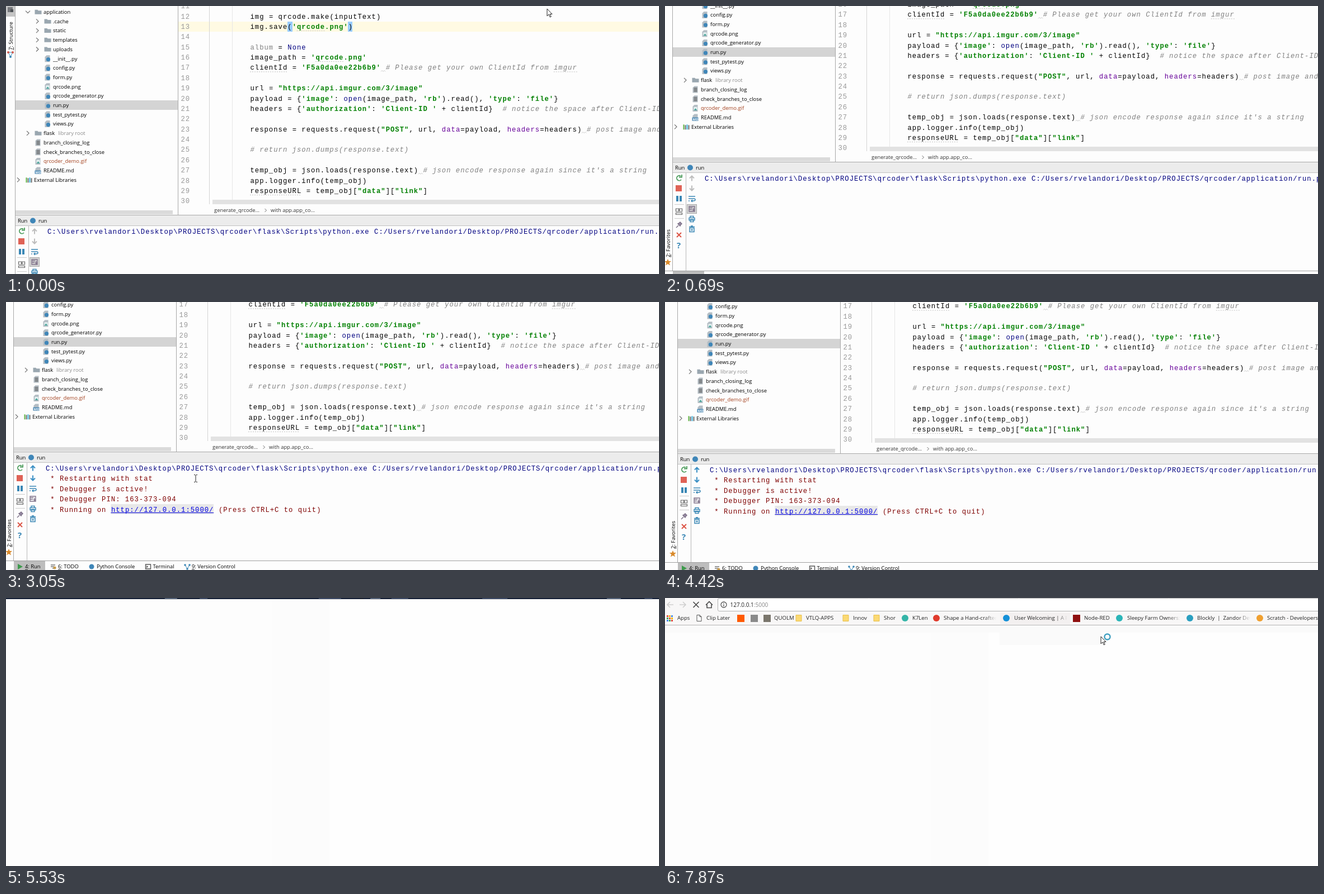
An HTML page with a canvas for the animation above (8 s loop, 1167 by 480 pixels).

```html
<!DOCTYPE html>
<html>
<head>
<meta charset="utf-8">
<style>
html, body { margin: 0; width: 100%; height: 100%; overflow: hidden; background: #fdfdfd; }
canvas { display: block; }
</style>
</head>
<body>
<canvas id="stage" width="1167" height="480"></canvas>
<script>
const g = document.getElementById('stage').getContext('2d');
const W = 1167, H = 480, LOOP = 8000;
const UI = '9.4px "Open Sans", sans-serif';
const WEB = '9.6px "Open Sans", sans-serif';
const MONO = '12.2px "Liberation Mono", monospace';
const CHAR = 8.35, LINE = 18.38;
const BLUE = '#3a87b5', GREY = '#6e6e6e';

// ---- timing: the picture holds between screen updates
const spans = [[0, 0, 1], [120, 1060, 8], [1180, 1180, 1], [1460, 2500, 9], [2660, 3580, 8],
  [3730, 4040, 3], [4420, 5270, 7], [5530, 6440, 8], [6590, 7590, 8], [7720, 7870, 2]];
const ticks = spans.flatMap(([a, b, n]) =>
  Array.from({ length: n }, (_, i) => a + (b - a) * i / (n - 1 || 1)));

// whole-pixel position on a keyed path
function along(keys, t) {
  const i = keys.findIndex(k => k[0] > t);
  if (i < 0) return keys[keys.length - 1].slice(1);
  if (!i) return keys[0].slice(1);
  const a = keys[i - 1], b = keys[i], p = (t - a[0]) / (b[0] - a[0]);
  return [1, 2].map(k => Math.round(a[k] + (b[k] - a[k]) * p));
}

const ideCamera = [[0, 0, 0], [650, -3, -95], [1180, -3, -106], [4280, -3, -106],
  [4420, 6, -103], [4950, 6, 0]];
const ideMouse = [[1180, 962, -20], [1460, 959, 37], [2500, 290, 371], [2800, 290, 371],
  [3580, 600, 23], [4040, 632, -20]];
const webCamera = [[5530, 0, -8], [6590, 0, 0], [7590, 8, -13]];
const webMouse = [[7450, 636, -5], [7590, 640, 10], [7720, 700, 35], [7870, 779, 69]];

// ---- drawing helpers
function rect(x, y, w, h, color) {
  g.fillStyle = color;
  g.fillRect(x, y, w, h);
}
function dot(x, y, r, color) {
  g.fillStyle = color;
  g.beginPath();
  g.arc(x, y, r, 0, 7);
  g.fill();
}
function text(s, x, y, color = '#000', font = UI, drop = 3.3, spacing = 0) {
  g.font = font;
  g.letterSpacing = spacing + 'px';
  g.fillStyle = color;
  g.fillText(s, x, y + drop);
}
function mono(s, x, y, color, style = '') {
  text(s, x + 0.5, y, color, style + MONO, 4, CHAR - 12.2 * 0.6);
}
function path(d, x, y, stroke, fill, width = 1) {
  const p = new Path2D(d);
  g.save();
  g.translate(x, y);
  if (fill) { g.fillStyle = fill; g.fill(p); }
  if (stroke) { g.strokeStyle = stroke; g.lineWidth = width; g.stroke(p); }
  g.restore();
}
function shortcut(s, x, y) {
  text(s, x, y);
  rect(x, y + 4.5, 5, 1, '#333');
}
function upright(s, x, y) {
  g.save();
  g.translate(x, y);
  g.rotate(-Math.PI / 2);
  shortcut(s, 0, 0);
  g.restore();
}
function dotted(x, y, chars) {
  for (let i = 0; i < chars * CHAR; i += 4) rect(x + i, y + 7, 2, 1, '#c4c4c4');
}
const ibeam = (x, y) => path('M-3 -6.5H-1L0 -5.5 1 -6.5H3M0 -5.5V5.5M-3 6.5H-1L0 5.5 1 6.5H3', x, y, '#222');
const arrow = (x, y) => path('M0 0V13L3 10 5.3 15 7.3 14 5 9.5H9Z', x, y, '#222', '#fff');

// ---- project tree
const tree = ('d67 application|d84 .cache|d84 static|d84 templates|d84 uploads|p84 __init__.py|' +
  'p84 config.py|p84 form.py|i84 qrcode.png|p84 qrcode_generator.py|p84 run.py|p84 test_pytest.py|' +
  'p84 views.py|d67 flask|t67 branch_closing_log|t67 check_branches_to_close|i67 qrcoder_demo.gif|' +
  'm67 README.md|l50 External Libraries').split('|');

function treeIcon(kind, x, y) {
  if (kind == 'd') return path('M-6 -4H-1L0 -2.5H6V4H-6Z', x, y, null, '#9aa7b0');
  if (kind == 'l') {
    ['#62b543', '#6e6e6e', '#40b6e0', '#6e6e6e'].forEach((c, i) => rect(x - 5 + i * 3, y - 4 + i % 2, 2, 9 - i % 2, c));
    return;
  }
  path('M-2 -6H4V6H-5V-3Z', x, y, null, '#b4bdc4');
  if (kind == 'p') dot(x + 1, y + 1.5, 3.6, '#3f86b8');
  if (kind == 't') for (let i = 0; i < 4; i++) rect(x - 3, y - 3 + i * 2, 6, 1, '#555');
  if (kind == 'i') { rect(x - 3, y - 2, 6, 6, '#e8f4f4'); path('M-3 4L0 0 3 4Z', x, y, null, '#4ba39a'); }
  if (kind == 'm') { rect(x - 6, y, 11, 6, '#4a88b5'); text('MD', x - 5, y + 2.5, '#fff', 'bold 6px "Open Sans", sans-serif', 2.5); }
}

function drawTree() {
  tree.forEach((row, i) => {
    const kind = row[0], x = +row.slice(1, 3), name = row.slice(4), y = 10.7 + 16.7 * i;
    if (name == 'run.py') rect(17, 169, 290, 17, '#d4d4d4');
    if (kind == 'd' || kind == 'l')
      path(i ? 'M-2 -4L2 0 -2 4' : 'M-4 -2L0 2 4 -2', x - 28, y, GREY, null, 1.2);
    treeIcon(kind, x - 9.5, y);
    text(name, x, y, name.endsWith('.gif') ? '#a3401d' : undefined);
  });
  text('library root', 93, 227.8, '#8c8c8c');
  rect(17, 366, 281, 7, '#dadada');
}

// ---- editor
const source = `img = qrcode.make(inputText)
img.save('qrcode.png')

album = None
image_path = 'qrcode.png'
clientId = 'F5a0da0ee22b6b9' # Please get your own ClientId from imgur

url = "https://api.imgur.com/3/image"
payload = {'image': open(image_path, 'rb').read(), 'type': 'file'}
headers = {'authorization': 'Client-ID ' + clientId}  # notice the space after Client-ID

response = requests.request("POST", url, data=payload, headers=headers) # post image and

# return json.dumps(response.text)

temp_obj = json.loads(response.text) # json encode response again since it's a string
app.logger.info(temp_obj)
responseURL = temp_obj["data"]["link"]`.split('\n');
const token = /#.*|'[^']*'|"[^"]*"|\w+|[^\w'"#]+/g;

function tokenStyle(s, rest) {
  if (s[0] == '#') return ['#808080', 'italic '];
  if (/^['"]/.test(s)) return ['#008000', 'bold '];
  if (/^(None|open)$/.test(s)) return ['#000080'];
  if (/^(data|headers)$/.test(s) && /^=\w/.test(rest)) return ['#660099'];
  return [s == 'album' ? '#808080' : '#000'];
}

function drawEditor() {
  const X = 436, lineY = n => 18.5 + LINE * (n - 12);
  rect(308, 28, W, 18, '#fffae3');
  rect(363, 0, 1, 355, '#d4d4d4');
  rect(404, 0, 1, 347, '#e6e6e6');
  rect(503, 28, 9, 18, '#99ccff');
  rect(611, 28, 8, 18, '#99ccff');
  for (let n = 11; n <= 30; n++) mono(n, 312, lineY(n), '#999');
  source.forEach((s, i) => {
    for (const m of s.matchAll(token)) {
      const x = X + m.index * CHAR;
      mono(m[0], x, lineY(i + 12), ...tokenStyle(m[0], s.slice(m.index + m[0].length)));
      // style hint where a trailing comment has only one space before it
      if (m[0][0] == '#' && m.index && s[m.index - 2] != ' ')
        path('M-8 7L-6 5 -4 7 -2 5 0 7', x, lineY(i + 12), '#ccc');
    }
  });
  [[13, 10, 6], [16, 14, 6], [17, 0, 8], [17, 65, 5], [29, 0, 11]]
    .forEach(([n, col, len]) => dotted(X + col * CHAR, lineY(n), len));
  rect(369, 347, W, 8, '#e2e2e2');
  rect(308, 355, W, 19, '#fdfdfd');
  text('generate_qrcode...', 372, 365.5, '#333');
  path('M-1.5 -3L1.5 0 -1.5 3', 464, 366, GREY);
  text('with app.app_co...', 473, 365.5, '#333');
}

// ---- run panel
function drawRunIcons(clicked) {
  const a = 28, b = 51, nav = clicked ? '#3a8fc4' : '#bdbdbd';
  path('M3 -3.5A4.5 4.5 0 1 0 4 3M5 -6V-1.5H0', a, 403, '#4a9b5a', null, 1.8);
  rect(22, 416, 11, 11, '#df6256');
  rect(23, 435, 4, 10, BLUE);
  rect(29, 435, 4, 10, BLUE);
  rect(20, 450, 17, 1, '#ccc');
  path('M-5.5 -5H-.5V0H-5.5ZM1 -5H5.5V0H1ZM-5.5 2.5H5.5V5.5H-5.5Z', a, 463, '#666', null, 1.2);
  rect(20, 475, 17, 1, '#ccc');
  path('M-5 5L-1 1M-2 -2L2 2 3 0 5 -2 2 -5 0 -3Z', a, 487, '#7b6f86', '#9a8da6', 1.4);
  path('M-4 -4L4 4M4 -4L-4 4', a, 505, '#dc5647', null, 2);
  text('?', a - 4, 523, BLUE, 'bold 15px "Open Sans", sans-serif', 5.5);
  path('M0 5V-4M-4 0L0 -4 4 0', b, 403.5, nav, null, 2);
  path('M0 -5V4M-4 0L0 4 4 0', b, 421.5, nav, null, 2);
  path('M-6 -4H6M-6 0H4Q6 0 6 2T3 4H-1M1 2L-1 4 1 6M-6 4H-4', b, 440, BLUE, null, 1.5);
  if (!clicked) {
    rect(42, 450, 18, 17, '#a8a8a8');
    rect(43, 451, 16, 15, '#d5d5d5');
  }
  path('M-5 -4.5H5V4.5H-5ZM-5 -2H1M-5 1H0M3 -2V3M1 1L3 3 5 1', b, 458.5, '#7d7088', null, 1.3);
  path('M-3 -5H3V-2H-3ZM-5 -2H5V2H-5ZM-3 1H3V5H-3Z', b, 476.5, BLUE, null, 1.4);
  path('M-5 -4H5M-2 -5.5H2M-4 -2H4V5H-4ZM-1 0V3M1 0V3', b, 494.5, BLUE, null, 1.5);
}

function drawConsole(t) {
  const x = 73.5, row = i => 404 + LINE * i, red = '#7f0000';
  mono('C:\\Users\\rvelandori\\Desktop\\PROJECTS\\qrcoder\\flask\\Scripts\\python.exe ' +
    'C:/Users/rvelandori/Desktop/PROJECTS/qrcoder/application/run.py', x, row(0), '#000080');
  if (t >= 1460) mono(' * Restarting with stat', x, row(1), red);
  if (t < 2230) return;
  const link = 'http://127.0.0.1:5000/', linkX = x + 14 * CHAR, len = link.length * CHAR;
  mono(' * Debugger is active!', x, row(2), red);
  mono(' * Debugger PIN: 163-373-094', x, row(3), red);
  mono(' * Running on ', x, row(4), red);
  if (t >= 2660) rect(linkX, 468, len, 18, '#e8e8e8');
  mono(link, linkX, row(4), '#0000e0');
  rect(linkX, 483, len, 1, '#0000e0');
  mono('(Press CTRL+C to quit)', linkX + len + CHAR, row(4), red);
}

function drawBottomBar() {
  const y = 580;
  rect(-6, 569, W + 20, 1, '#a0a0a0');
  rect(17, 570, 56, 22, '#bdbdbd');
  path('M-4 -5L5 0 -4 5Z', 28, y, null, '#3d9a4c');
  path('M-5 -3H3M-5 0H1M-2 3H4', 88, y, '#777', null, 1.4);
  dot(90, y + 2, 2.5, '#c79a4a');
  dot(156, y, 4.5, '#3f86b8');
  path('M-4.5 -4H4.5V4H-4.5ZM-3 -1L-1 0 -3 2', 257, y, '#555', null, 1.4);
  path('M-4 -3L0 4 4 -3', 327, y, BLUE);
  [[-4, -3], [0, 4], [4, -3]].forEach(([x, dy]) => dot(327 + x, y + dy, 1.8, BLUE));
  shortcut('4: Run', 37, y);
  shortcut('6: TODO', 96, y);
  text('Python Console', 165, y);
  text('Terminal', 265.5, y);
  shortcut('9: Version Control', 335, y);
}

function drawIde(t) {
  g.save();
  g.translate(...along(ideCamera, t));
  rect(0, 0, 16, 19, '#c4c4c4');
  rect(3, 2, 9, 9, '#77787c');
  rect(8, 6, 5, 5, '#4e5256');
  upright('7: Structure', 8.5, 79);
  path('M-4 -4H4L0 4Z', 8, 87, BLUE);
  dot(4, 83, 2, '#d0574a');
  dot(12, 83, 2, '#d0574a');
  dot(8, 91, 2, BLUE);
  upright('2: Favorites', 8.5, 545);
  path('M0 -6L1.7 -2 6 -2 2.6 1 4 5.5 0 3 -4 5.5 -2.6 1 -6 -2 -1.7 -2Z', 8, 554, null, '#d98a2b');
  drawTree();
  drawEditor();
  rect(307, 0, 1, 374, '#a8a8a8');
  rect(16, 0, 1, 569, '#a8a8a8');
  rect(17, 374, W, 20, '#ececec');
  rect(17, 374, W, 1, '#a8a8a8');
  rect(17, 393, W, 1, '#c2c2c2');
  rect(40, 394, 1, 175, '#b8b8b8');
  text('Run', 21, 384.5);
  dot(48, 384.5, 5, '#3f86b8');
  text('run', 58, 384.5);
  drawRunIcons(t >= 2660);
  drawConsole(t);
  drawBottomBar();
  if (t < 1180) arrow(967, 5);
  g.restore();
  if (t >= 1180) ibeam(...along(ideMouse, t));
}

// ---- browser: icon x, shape, colour, label x, label, right end of the fade
const bookmarks = [
  [53, 'page', '#555', 66, 'Clip Later'], [127, 'square', '#ff5a00'], [151, 'square', '#8a8a8a'],
  [174, 'square', '#7a766c', 187, 'QUOLM'], [231, 'folder', '#fbd973', 244, 'VTLQ-APPS'],
  [315, 'folder', '#fbd973', 328, 'Innov'], [370, 'folder', '#fbd973', 383, 'Shor'],
  [421, 'circle', '#35b5a8', 434, 'K7Len'], [477, 'circle', '#e03a2c', 490, 'Shape a Hand-crafted', 584],
  [602, 'circle', '#1490d8', 616, 'User Welcoming | A I', 712], [727, 'square', '#8f1010', 741, 'Node-RED'],
  [804, 'circle', '#2bb5b8', 818, 'Sleepy Farm Owners: 3', 914],
  [930, 'circle', '#2a9fc0', 943, 'Blockly  |  Zandor Dev', 1038],
  [1055, 'circle', '#f0a030', 1068, 'Scratch - Developers']];

function drawBookmark([x, shape, color, labelX, label, end]) {
  const y = 49;
  if (shape == 'page') path('M-4 -5.5H1L4 -2.5V5.5H-4ZM1 -5.5V-2.5H4', x, y, color, '#fff');
  if (shape == 'square') rect(x - 6, y - 6, 13, 13, color);
  if (shape == 'circle') dot(x, y, 6, color);
  if (shape == 'folder') path('M-5 -5.5H5V5.5H-5Z', x, y, '#e8c04f', color);
  if (!label) return;
  let ink = '#222';
  if (end) {
    ink = g.createLinearGradient(end - 22, 0, end, 0);
    ink.addColorStop(0, '#222');
    ink.addColorStop(1, '#2220');
  }
  text(label, labelX, y, ink, WEB, 3.4);
}

function drawToolbar(t) {
  path('M-10 10V-30H138Q146 -30 150 -9L160 10Z', 0, 0, null, '#f2f1f1');
  path('M162 -8H182L188 5H168Z', 0, 0, null, '#a9abb0');
  path('M6 -4A5 5 0 1 0 16 -2', 0, 0, '#999', null, 1.5);
  text('Loading...', 22, -1);
  path('M-3 -3L3 3M3 -3L-3 3', 143, 0, '#555', null, 1.4);
  rect(-10, 10, W + 20, 51, '#f8f7f7');
  path('M6 0H-5M0 -5L-5 0 0 5', 1, 25, '#cfcfcf', null, 1.6);
  path('M-6 0H5M0 -5L5 0 0 5', 24, 25, '#cfcfcf', null, 1.6);
  path('M-5 -5L5 5M5 -5L-5 5', 47.5, 25, '#4a4a4a', null, 1.7);
  path('M-6 1L0 -5 6 1M-4 0V6H4V0', 71, 24.5, '#4a4a4a', null, 1.6);
  path('M89 13.5H1200V36.5H89Q86.5 36.5 86.5 34V16Q86.5 13.5 89 13.5Z', 0, 0, '#b0b0b0', '#fff');
  path('M-5 0A5 5 0 1 1 5 0A5 5 0 1 1 -5 0M0 -3V-1.5M0 -.5V3', 97, 25, '#555', null, 1.3);
  const font = '10px "Open Sans", sans-serif';
  text('127.0.0.1', 108.5, 25, '#222', font, 3.6);
  text(':5000', 108.5 + g.measureText('127.0.0.1').width, 25, '#888', font, 3.6);
  const dots = ['#e04a3c', '#3aa757', '#4688f1', '#f4b400'];
  for (let i = 0; i < 9; i++) rect(-5 + i % 3 * 4, 44 + (i / 3 | 0) * 4, 3, 3, dots[i * 3 % 4]);
  text('Apps', 14, 49, '#222', WEB, 3.4);
  if (t >= 7720) rect(591, 39, 125, 21, '#f3f0f0');
  bookmarks.forEach(drawBookmark);
  rect(-10, 61, W + 20, 1, '#b4b4b4');
}

function drawBrowser(t) {
  rect(0, 0, W, H, '#fefefe');
  rect(0, 0, 476, H, '#fdfdfd');
  rect(476, 0, 102, H, '#fcfcfc');
  if (t >= 7590) rect(0, 49, W, 13, '#fafafa');
  if (t >= 7870) rect(598, 49, 182, 35, '#fafafa');
  g.save();
  g.translate(...along(webCamera, t));
  rect(-10, -20, W + 20, 30, '#0e1a33');
  [[285, 22], [345, 14], [560, 40], [650, 18], [690, 30], [850, 45], [1075, 25], [1140, 14]].forEach(([x, w], i) => {
    const lean = i % 2 ? 14 : -14;
    path(`M0 10L${lean} -8H${w + lean}L${w} 10Z`, x, 0, null, i % 3 ? '#55668a' : '#8496b0');
  });
  rect(-10, 9, W + 20, 1, '#1a2438');
  if (t >= 5790) drawToolbar(t);
  g.restore();
  const [x, y] = along(webMouse, t);
  if (t < 7590) return ibeam(x, y);
  arrow(x, y);
  path('M-5 0A5 5 0 1 1 5 0A5 5 0 1 1 -5 0', x + 11.5, y + 0.5, '#3f9fc0', null, 2.4);
}

function draw() {
  const now = performance.now() % LOOP;
  const t = ticks.findLast(v => v <= now);
  rect(0, 0, W, H, '#fdfdfd');
  (t < 4950 ? drawIde : drawBrowser)(t);
  requestAnimationFrame(draw);
}
draw();
</script>
</body>
</html>
```
